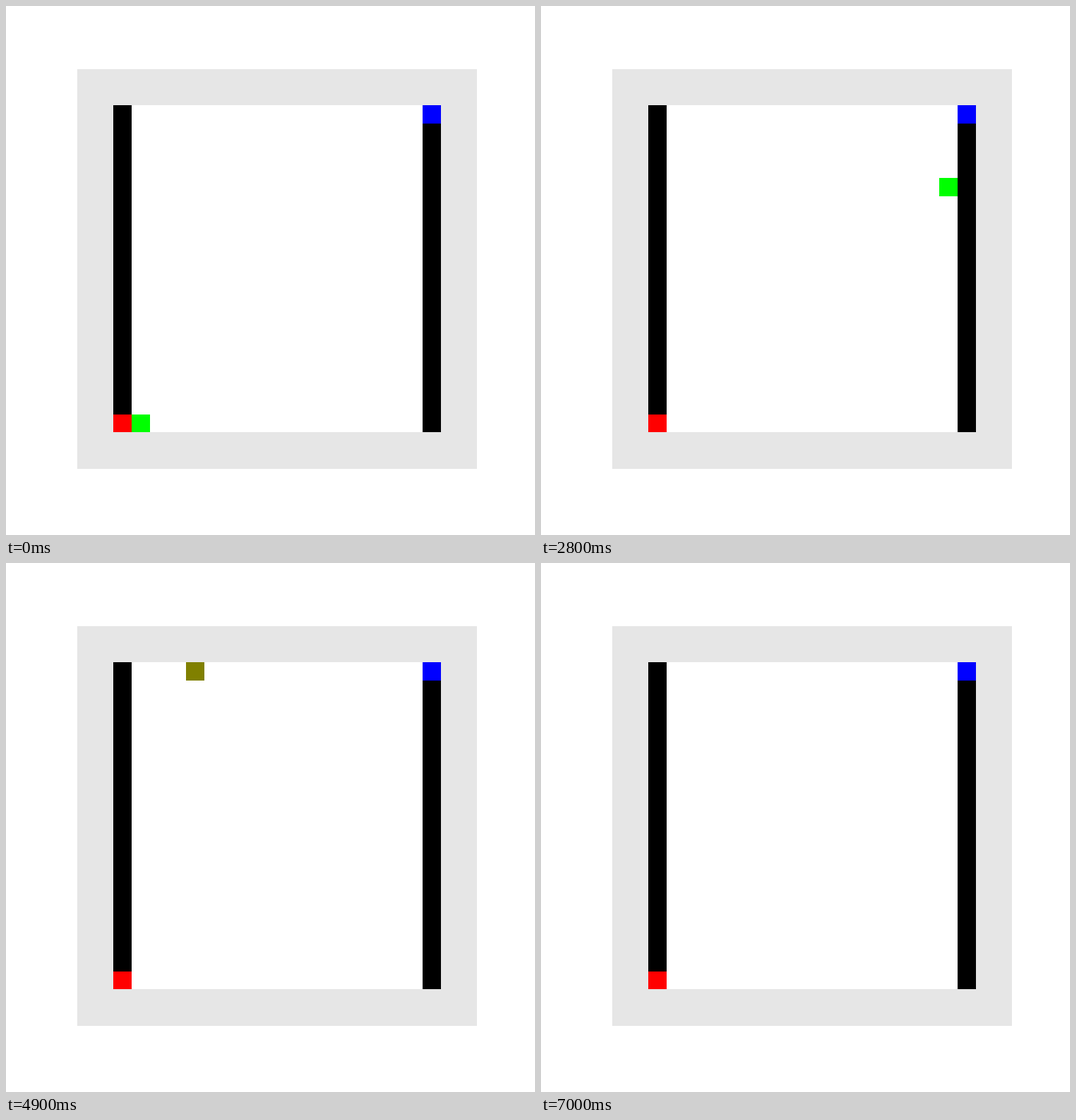
Write an HTML page with a canvas that moves like this. It is 720 px wide and 720 px high and loops after 9000 ms.

```html
<!DOCTYPE html>
<html lang="en">
<head>
<meta charset="utf-8">
<title>Round trip</title>
<style>
html, body { margin: 0; width: 100%; height: 100%; overflow: hidden; background: #fff; }
canvas { display: block; }
</style>
</head>
<body>
<canvas id="stage" width="720" height="720"></canvas>
<script>
const ctx = document.getElementById('stage').getContext('2d');
const CELL = 544 / 22, LEFT = 97, TOP = 85.9;
const STEP = 100, LOOP = 9000;
const px = i => Math.round(LEFT + i * CELL);
const py = j => Math.round(TOP + j * CELL);

// Fills a block of grid cells, edges snapped to whole pixels.
function block(col, row, w, h, color) {
  ctx.fillStyle = color;
  ctx.fillRect(px(col), py(row), px(col + w) - px(col), py(row + h) - py(row));
}

// Along the bottom and up the right side, then along the top and down the left.
function packet(n) {
  if (n < 33) {
    block(Math.min(3 + n, 18), Math.min(19, 34 - n), 1, 1, '#00ff00');
  } else if (n >= 37 && n < 70) {
    const k = n - 37;
    block(Math.max(18 - k, 3), Math.max(2, k - 13), 1, 1, '#808000');
  }
}

function draw(t) {
  ctx.fillStyle = '#fff';
  ctx.fillRect(0, 0, 720, 720);
  block(0, 0, 22, 22, '#e6e6e6');
  block(2, 2, 18, 18, '#fff');
  block(2, 2, 1, 18, '#000');
  block(19, 2, 1, 18, '#000');
  block(2, 19, 1, 1, '#f00');
  block(19, 2, 1, 1, '#00f');
  packet(Math.floor(t / STEP));
}

const start = performance.now();
function tick() {
  draw((performance.now() - start) % LOOP);
  requestAnimationFrame(tick);
}
tick();
</script>
</body>
</html>
```
